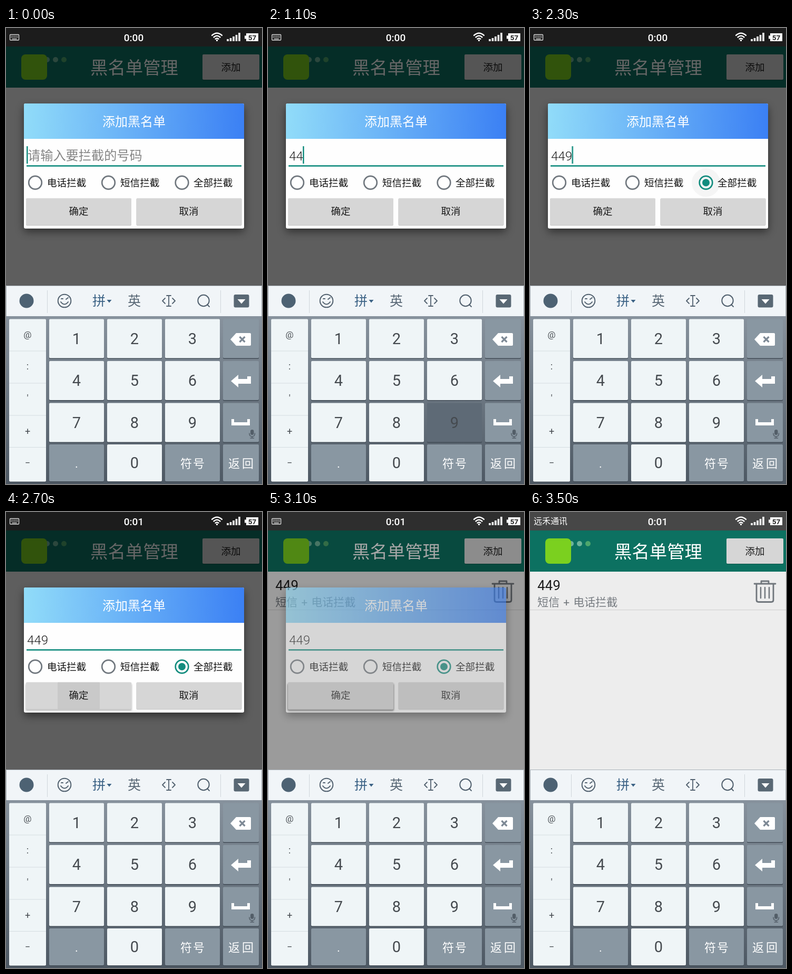
An HTML page that plays this animation: 486 px wide and 864 px high, repeating every 4 s.

```html
<!DOCTYPE html>
<html lang="zh-CN">
<head>
<meta charset="utf-8">
<title>黑名单管理</title>
<style>
html, body { margin: 0; width: 100%; height: 100%; overflow: hidden; background: #ededed; }
svg { display: block; width: 486px; height: 864px; }
text { font-family: Roboto, "Noto Sans CJK SC", "Noto Sans CJK", sans-serif; }
.mid { text-anchor: middle; }
.line { fill: none; stroke-linecap: round; stroke-linejoin: round; }
.light { font-weight: 300; }

/* One shared 4 s clock with hard steps */
.hint, .n1, .n2, .n3, .caret, .key4, .key9, .picked, .dot, .halo, .wave, .lift,
.dim, .dialog, .row, .clock0, .clock1, .kbd, .carrier { animation: 4s step-end infinite; }
.hint { animation-name: hint; }
.n1 { animation-name: n1; }
.n2 { animation-name: n2; }
.n3 { animation-name: n3; }
.caret { animation-name: caret, move; }
.key4 { animation-name: key4; }
.key9 { animation-name: key9; }
.picked { animation-name: picked; }
.dot { animation-name: dot; transform-origin: 334px 293px; }
.halo { animation-name: halo; transform-origin: 334px 293px; }
.wave { animation-name: wave; transform-origin: 138px 348px; }
.lift { animation-name: lift; }
.dim { animation-name: dim; }
.dialog { animation-name: dialog; }
.row { animation-name: row; }
.clock0 { animation-name: clock0; }
.clock1 { animation-name: clock1; }
.kbd { animation-name: kbd; }
.carrier { animation-name: carrier; }

@keyframes hint { 0% { opacity: 1 } 15%, 100% { opacity: 0 } }
@keyframes n1 { 0% { opacity: 0 } 15% { opacity: 1 } 20%, 100% { opacity: 0 } }
@keyframes n2 { 0% { opacity: 0 } 20% { opacity: 1 } 30%, 100% { opacity: 0 } }
@keyframes n3 { 0% { opacity: 0 } 30%, 100% { opacity: 1 } }
@keyframes caret {
  0% { opacity: 1 } 2.5% { opacity: 0 } 15% { opacity: 1 }
  40% { opacity: 0 } 52.5% { opacity: 1 } 67.5%, 100% { opacity: 0 }
}
@keyframes move {
  0% { transform: none } 15% { transform: translateX(13.4px) }
  20% { transform: translateX(27px) } 30%, 100% { transform: translateX(40.4px) }
}
@keyframes key4 {
  0% { fill: #eff5f7 } 12.5% { fill: #5e6a76 } 15% { fill: #eff5f7 }
  17.5% { fill: #5e6a76 } 20%, 100% { fill: #eff5f7 }
}
@keyframes key9 { 0% { fill: #eff5f7 } 27.5% { fill: #5e6a76 } 30%, 100% { fill: #eff5f7 } }
@keyframes picked { 0% { stroke: #70777e } 52.5%, 100% { stroke: #128c7e } }
@keyframes dot { 0% { transform: scale(0) } 52.5% { transform: scale(.6) } 55%, 100% { transform: none } }
@keyframes halo {
  0% { opacity: 0 } 50% { opacity: .07; transform: scale(.6) } 52.5% { opacity: .07; transform: scale(.85) }
  55% { opacity: .05; transform: none } 57.5% { opacity: .035; transform: none }
  60% { opacity: .015; transform: none } 62.5%, 100% { opacity: 0 }
}
@keyframes wave {
  0% { opacity: 0 } 67.5% { opacity: .06; transform: scale(.4, 1) } 70% { opacity: .06; transform: scale(.75, 1) }
  72.5% { opacity: .04; transform: none } 75%, 100% { opacity: 0 }
}
@keyframes lift { 0% { opacity: 0 } 67.5% { opacity: .4 } 70%, 100% { opacity: 1 } }
@keyframes dim { 0% { opacity: .6 } 77.5% { opacity: .35 } 80%, 100% { opacity: 0 } }
@keyframes dialog { 0% { opacity: 1 } 77.5% { opacity: .6 } 80%, 100% { opacity: 0 } }
@keyframes row { 0% { opacity: 0 } 77.5%, 100% { opacity: 1 } }
@keyframes clock0 { 0% { opacity: 1 } 67.5%, 100% { opacity: 0 } }
@keyframes clock1 { 0% { opacity: 0 } 67.5%, 100% { opacity: 1 } }
@keyframes kbd { 0% { opacity: 1 } 87.5%, 100% { opacity: 0 } }
@keyframes carrier { 0% { opacity: 0 } 87.5%, 100% { opacity: 1 } }
</style>
</head>
<body>
<svg viewBox="0 0 486 864">
  <defs>
    <linearGradient id="sky" x1="0" y1="0" x2="1" y2="0">
      <stop offset="0" stop-color="#91dcf9"/><stop offset="1" stop-color="#3b80f4"/>
    </linearGradient>
    <linearGradient id="pad" x1="0" y1="0" x2="0" y2="1">
      <stop offset="0" stop-color="#87929d"/><stop offset="1" stop-color="#4d5863"/>
    </linearGradient>
    <filter id="soft" x="-20%" y="-20%" width="140%" height="150%"><feGaussianBlur stdDeviation="8"/></filter>
    <filter id="thin" x="-10%" y="-30%" width="120%" height="160%"><feGaussianBlur stdDeviation="1.5"/></filter>
  </defs>

  <!-- Page -->
  <rect width="486" height="864" fill="#ededed"/>
  <rect width="486" height="36" fill="#474747"/>
  <rect y="35" width="486" height="78" fill="#0c7161"/>
  <g fill="#6fb39a">
    <circle cx="78" cy="60" r="5"/><circle cx="94" cy="60" r="5"/><circle cx="110" cy="60" r="5" fill="#4ea66c"/>
  </g>
  <rect x="29" y="50" width="49" height="48" rx="8" fill="#7bd01f"/>
  <text x="160" y="86.5" font-size="33.4" fill="#fff">黑名单管理</text>
  <rect x="373" y="51" width="108" height="48" rx="2" fill="#000" opacity=".25"/>
  <rect x="373" y="50" width="108" height="48" rx="2" fill="#d6d6d6"/>
  <text class="mid" x="427" y="81" font-size="18.5" fill="#1c1c1c">添加</text>
  <g class="row">
    <text x="14" y="148" font-size="26" fill="#1e1e1e">449</text>
    <text x="14" y="178" font-size="21" word-spacing="2" fill="#767b80">短信 + 电话拦截</text>
    <rect y="185" width="486" height="1" fill="#cfcfcf"/>
    <g class="line" stroke="#70767c" stroke-width="2.8">
      <path d="M426 136H466M439 135V131H453V135M430 138V167Q430 170.500 434 170.500H458Q462 170.500 462 167V138"/>
      <path d="M438 143V163M446 143V163M454 143V163" stroke-width="2.4"/>
    </g>
  </g>
  <rect class="dim" width="486" height="864"/>

  <!-- Dialog -->
  <g class="dialog">
    <rect x="34" y="150" width="418" height="236" rx="4" opacity=".5" filter="url(#soft)"/>
    <rect x="34" y="143" width="418" height="237" rx="3" fill="#fefefe"/>
    <path d="M34 210V146Q34 143 37 143H449Q452 143 452 146V210Z" fill="url(#sky)"/>
    <text class="mid" x="243" y="186" font-size="24" fill="#fff">添加黑名单</text>

    <text class="hint" x="41" y="250" font-size="24.200" fill="#858585">请输入要拦截的号码</text>
    <g class="light" font-size="24" fill="#222">
      <text class="n1" x="40" y="251">4</text>
      <text class="n2" x="40" y="251">44</text>
      <text class="n3" x="40" y="251">449</text>
    </g>
    <rect class="caret" x="39" y="224" width="2.500" height="33" fill="#128c7e"/>
    <rect x="39" y="260" width="408" height="2.600" fill="#128c7e"/>

    <circle class="halo" cx="334" cy="293" r="27"/>
    <g fill="none" stroke="#70777e" stroke-width="2.700">
      <circle cx="55.500" cy="293" r="12.300"/>
      <circle cx="194.500" cy="293" r="12.300"/>
      <circle class="picked" cx="334" cy="293" r="12.300"/>
    </g>
    <circle class="dot" cx="334" cy="293" r="7" fill="#128c7e"/>
    <g font-size="18.600" fill="#111">
      <text x="78" y="300">电话拦截</text>
      <text x="217" y="300">短信拦截</text>
      <text x="356" y="300">全部拦截</text>
    </g>

    <rect class="lift" x="37" y="325" width="202" height="52" rx="3" fill="#777" filter="url(#thin)"/>
    <g fill="#c4c4c4">
      <rect x="38" y="323" width="200" height="51.500" rx="2"/><rect x="247.500" y="323" width="200" height="51.500" rx="2"/>
    </g>
    <g fill="#d6d6d6">
      <rect x="38" y="322.500" width="200" height="51" rx="2"/><rect x="247.500" y="322.500" width="200" height="51" rx="2"/>
    </g>
    <rect class="wave" x="38" y="322.500" width="200" height="51" rx="2"/>
    <g class="mid" font-size="18.500" fill="#1c1c1c">
      <text x="138" y="354">确定</text><text x="347" y="354">取消</text>
    </g>
  </g>

  <!-- Keyboard toolbar -->
  <rect y="488" width="486" height="59" fill="#f1f5f8"/>
  <path d="M.5 546V488.500H485.500V546" fill="none" stroke="#a9b1b8"/>
  <path d="M78.500 497V540M407.500 497V540" stroke="#d0d6db"/>
  <circle cx="39" cy="517" r="13.500" fill="#4d6273"/>
  <g class="line" stroke="#52616f" stroke-width="2">
    <circle cx="111" cy="517" r="12.300"/>
    <path d="M104 519Q111 528 118 519M105 513H108M114 514L118 511"/>
    <path d="M302 512L297 517L302 522M316 512L321 517L316 522M305 507H313M309 507V527M305 527H313" stroke-width="1.800"/>
    <circle cx="375" cy="516.500" r="10.700"/><path d="M382 524L386 528"/>
  </g>
  <text x="164" y="526" font-size="25" fill="#3b6285">拼</text>
  <path d="M191.500 515H200.500L196 520.500Z" fill="#3b6285"/>
  <text x="231" y="526" font-size="25" fill="#586775">英</text>
  <rect x="432.500" y="505" width="29" height="24.500" rx="3" fill="#596874"/>
  <path d="M439.500 514H454.500L447 522.500Z" fill="#fff"/>

  <!-- Keypad -->
  <rect y="546" width="486" height="318" fill="url(#pad)"/>
  <rect x="6" y="553" width="70" height="308" rx="2" fill="#404a54"/>
  <rect x="6" y="551.500" width="70" height="308" rx="2" fill="#eff5f7"/>
  <path d="M6 612H76M6 673H76M6 734H76M6 794.500H76" stroke="#d5dde1"/>
  <g class="mid" font-size="18" fill="#4a4f54">
    <text x="41" y="587" font-size="17">@</text><text x="41" y="647">:</text>
    <text x="41" y="708">′</text><text x="41" y="770">+</text><text x="41" y="830">−</text>
  </g>
  <g id="keys"></g>
  <g fill="#fff">
    <path d="M426 590L437 578H463Q465 578 465 580V600Q465 602 463 602H437Z"/>
    <path d="M427 669L441 657V665H458V660H465V674H441V681Z"/>
    <path d="M428 741H433V747H458V741H463V753H428Z"/>
  </g>
  <path d="M443.500 585L453.500 595M453.500 585L443.500 595" stroke="#7d8995" stroke-width="3.200"/>
  <rect x="464" y="761" width="6.500" height="10" rx="3.200" fill="#535e68"/>
  <path class="line" d="M462 768Q462 774 467.200 774T472.500 768M467.200 774V777M464 777H470.500" stroke="#535e68" stroke-width="1.500"/>

  <!-- Status bar -->
  <g class="kbd line" stroke="#ddd" stroke-width="1.300">
    <rect x="7.500" y="12.500" width="17" height="10.500" rx="1"/>
    <path d="M10 15.500H22M10 18H22" stroke-dasharray=".6 2.300"/><path d="M12 20.700H20"/>
  </g>
  <text class="carrier" x="7" y="23" font-size="16" font-weight="500" fill="#fff">远禾通讯</text>
  <g class="mid" font-size="19" font-weight="500" fill="#fff">
    <text class="clock0" x="242.500" y="24.500">0:00</text>
    <text class="clock1" x="242.500" y="24.500">0:01</text>
  </g>
  <g class="line" stroke="#fff" stroke-width="2.400">
    <path d="M391 14Q400.500 5.500 410 14M394.500 17.500Q400.500 12 406.500 17.500M397.500 20.800Q400.500 18.200 403.500 20.800"/>
  </g>
  <circle cx="400.500" cy="23.500" r="1.700" fill="#fff"/>
  <path d="M421 25V21M426.500 25V19M432 25V16M437.500 25V13M443 25V9" stroke="#fff" stroke-width="3.600"/>
  <path d="M453 14.500H456V10H479V25H456V20.500H453Z" fill="#fff"/>
  <text class="mid" x="467.500" y="22.500" font-size="13.500" font-weight="700" fill="#222">57</text>
</svg>
<script>
const cols = [[82, 104], [192, 104], [302, 104], [412, 68]];
const rows = [[551.5, 74], [631, 74], [710.5, 74], [789, 70]];
const labels = [
  ["1", "2", "3", ""],
  ["4", "5", "6", ""],
  ["7", "8", "9", ""],
  [".", "0", "符号", "返回"]
];

function key(label, [x, w], [y, h]) {
  const digit = /\d/.test(label);
  const box = `x="${x}" width="${w}" height="${h}" rx="2"`;
  const size = digit ? 29 : 22;
  const gap = label === "返回" ? 4 : label === "符号" ? 2 : 0;
  const base = y + h / 2 + (digit ? 10 : 9);
  return `<rect ${box} y="${y + 1.5}" fill="#404a54"/>
    <rect class="key${label}" ${box} y="${y}" fill="${digit ? "#eff5f7" : "#8997a2"}"/>
    <text class="mid" x="${x + w / 2 + gap / 2}" y="${base}" font-size="${size}"
      letter-spacing="${gap}" fill="${digit ? "#454a4f" : "#fff"}">${label}</text>`;
}

document.getElementById("keys").innerHTML =
  rows.map((row, r) => cols.map((col, c) => key(labels[r][c], col, row)).join("")).join("");
</script>
</body>
</html>
```
